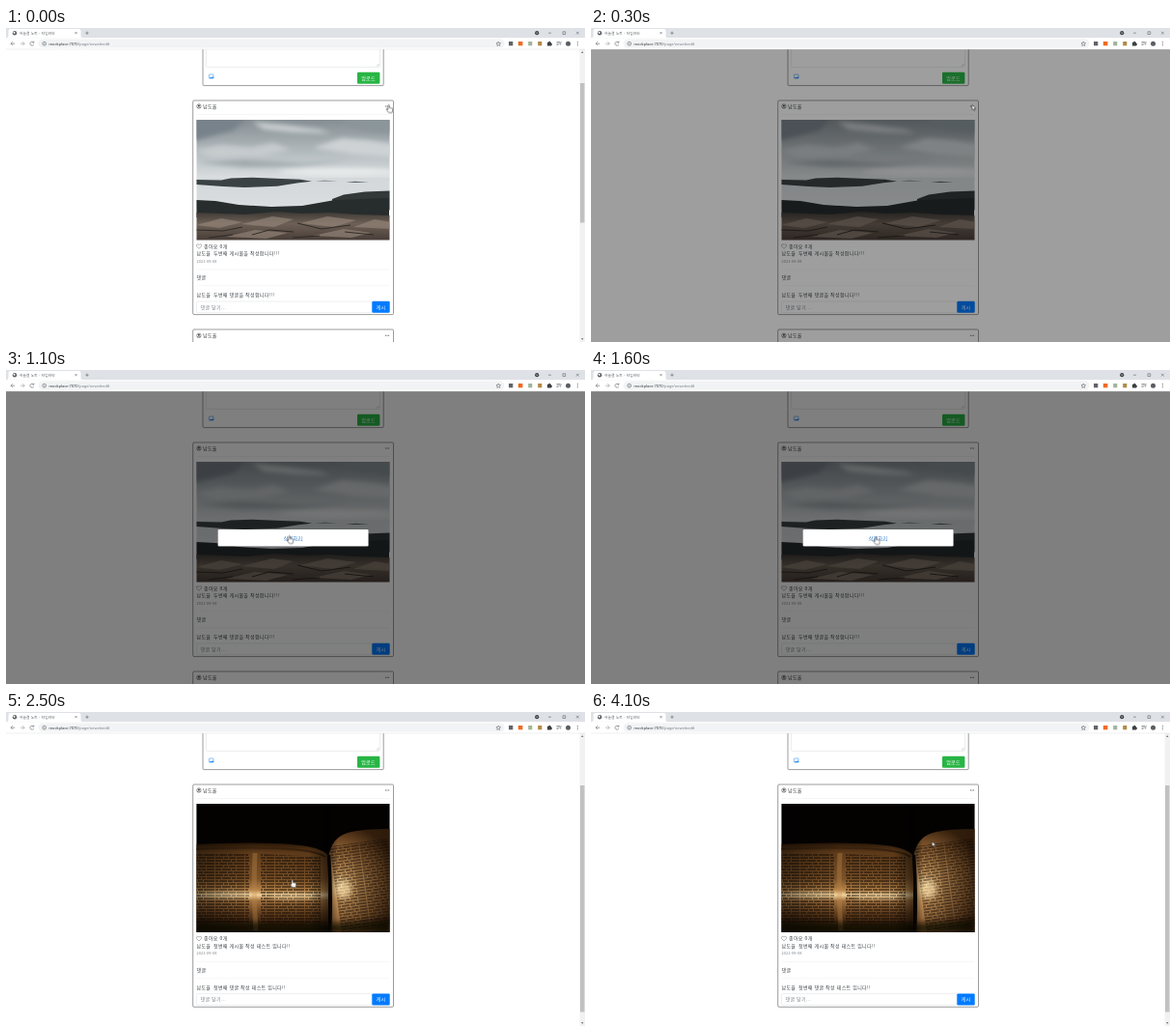
Animation of 600 by 325 pixels, one loop 4200 ms. Source, as an HTML page:

```html
<!DOCTYPE html>
<html lang="ko">
<head>
<meta charset="utf-8">
<title>Timeline</title>
<style>
html, body { margin: 0; width: 100%; height: 100%; overflow: hidden; background: #fff; }
svg { display: block; width: 600px; height: 325px; }
text { font: 5px "Noto Sans CJK KR", "Noto Sans CJK", sans-serif; letter-spacing: .33px; fill: #3d4247; }
.b { font-weight: 500; }
.date { font-size: 3.9px; letter-spacing: .1px; }
.tab { font-size: 3.7px; letter-spacing: .15px; fill: #55595e; }
.url { font: 4.1px Roboto, sans-serif; letter-spacing: 0; }
.w { fill: #fff; }
.mute { fill: #7b838a; }
.box { fill: #fff; stroke: #4a4a4a; stroke-width: .55; }
.field { fill: #fff; stroke: #ced4da; stroke-width: .4; }
.hr { stroke: #000; stroke-opacity: .1; stroke-width: .35; }
.line { fill: none; stroke: #5f6368; stroke-width: .6; }

.anim, .anim * { transform-origin: 0 0; }
.before, .after, .busy, .idle, .bar, .under, .hand, .arrow, .shade, .fade, .slide, .move {
  animation: 4200ms step-end infinite;
}
.before { animation-name: before; }
.after { animation-name: after; }
.busy { animation-name: busy; }
.idle { animation-name: idle; }
.bar { animation-name: bar; }
.under { animation-name: under; }
.hand { animation-name: hand; }
.arrow { animation-name: arrow; }
.shade { animation-name: shade; }
.fade { animation-name: fade; }
.slide { animation-name: slide; }
.move { animation-name: move; }

@keyframes before { 0% { visibility: visible } 59.52%, 100% { visibility: hidden } }
@keyframes after { 0% { visibility: hidden } 59.52%, 100% { visibility: visible } }
@keyframes busy { 0%, 59.52%, 100% { visibility: hidden } 57.14% { visibility: visible } }
@keyframes idle { 0%, 59.52%, 100% { visibility: visible } 57.14% { visibility: hidden } }
@keyframes bar { 0% { visibility: visible } 4.76%, 100% { visibility: hidden } }
@keyframes under { 0% { opacity: 0 } 26.19%, 100% { opacity: 1 } }
@keyframes hand {
  0%, 26.19%, 59.52% { visibility: visible }
  4.76%, 52.38%, 61.9%, 100% { visibility: hidden }
}
@keyframes arrow {
  0%, 26.19%, 59.52% { visibility: hidden }
  4.76%, 52.38%, 61.9%, 100% { visibility: visible }
}
@keyframes shade {
  0%, 59.52%, 100% { opacity: 0 }
  4.76% { opacity: .05 }
  7.14% { opacity: .38 }
  9.52% { opacity: .5 }
}
@keyframes fade {
  0%, 59.52%, 100% { opacity: 0 }
  9.52% { opacity: .5 }
  11.9% { opacity: 1 }
}
@keyframes slide {
  0%, 9.52% { transform: translateY(-53px) }
  11.9% { transform: translateY(-22px) }
  14.28% { transform: translateY(-3.5px) }
  16.66%, 100% { transform: none }
}
@keyframes move {
  0% { transform: translate(396px, 79.5px) }
  2.38% { transform: translate(395px, 79.5px) }
  14.28% { transform: translate(395px, 79.5px); animation-timing-function: steps(5) }
  26.19% { transform: translate(293px, 171.5px) }
  33.33% { transform: translate(293.5px, 172px) }
  38.09% { transform: translate(294.5px, 172.5px) }
  59.52% { transform: translate(296px, 173.5px) }
  69.04% { transform: translate(296px, 173.5px); animation-timing-function: steps(6) }
  83.33% { transform: translate(206px, 203px) }
  85.71% { transform: translate(190px, 209px); animation-timing-function: steps(3) }
  92.85% { transform: translate(285px, 83px); animation-timing-function: steps(2) }
  97.61%, 100% { transform: translate(353.5px, 134px) }
}
</style>
</head>
<body>
<svg class="anim" viewBox="0 0 600 325">
  <defs>
    <linearGradient id="sky" x2="0" y2="1">
      <stop offset="0" stop-color="#858e93"/>
      <stop offset=".35" stop-color="#a3abaf"/>
      <stop offset=".7" stop-color="#c3c9cc"/>
      <stop offset="1" stop-color="#dee1e2"/>
    </linearGradient>
    <linearGradient id="sea" x2="0" y2="1">
      <stop offset="0" stop-color="#d3d8da"/>
      <stop offset="1" stop-color="#d9dde0"/>
    </linearGradient>
    <linearGradient id="rock" x2="0" y2="1">
      <stop offset="0" stop-color="#3c3834"/>
      <stop offset=".4" stop-color="#6d6056"/>
      <stop offset="1" stop-color="#453b35"/>
    </linearGradient>
    <linearGradient id="page" gradientUnits="userSpaceOnUse" x1="0" y1="136" x2="0" y2="228">
      <stop offset="0" stop-color="#2b1808"/>
      <stop offset=".1" stop-color="#5e3b1a"/>
      <stop offset=".4" stop-color="#7c5228"/>
      <stop offset=".53" stop-color="#b98548"/>
      <stop offset=".58" stop-color="#efcf98"/>
      <stop offset=".64" stop-color="#a57440"/>
      <stop offset=".8" stop-color="#5c391a"/>
      <stop offset="1" stop-color="#1d0f05"/>
    </linearGradient>
    <radialGradient id="leaf" gradientUnits="userSpaceOnUse" cx="347" cy="180" r="62">
      <stop offset="0" stop-color="#f3d59e"/>
      <stop offset=".25" stop-color="#c4935a"/>
      <stop offset=".65" stop-color="#84592f"/>
      <stop offset="1" stop-color="#3c230e"/>
    </radialGradient>
    <linearGradient id="side">
      <stop offset="0" stop-opacity=".4"/>
      <stop offset=".3" stop-opacity="0"/>
      <stop offset=".58" stop-opacity=".05"/>
      <stop offset=".68" stop-opacity=".55"/>
      <stop offset=".73" stop-opacity="0"/>
      <stop offset="1" stop-opacity=".25"/>
    </linearGradient>
    <pattern id="print" width="31" height="9" patternUnits="userSpaceOnUse">
      <path d="M0 1h6m1 0h9m1 0h4m1 0h8M0 4h3m1 0h8m1 0h5m1 0h11M0 7h8m1 0h4m1 0h7m1 0h8" stroke="#150a03" stroke-width="1.5" stroke-opacity=".68"/>
    </pattern>
    <filter id="soft" x="-20%" y="-50%" width="140%" height="200%"><feGaussianBlur stdDeviation="2.5"/></filter>
    <clipPath id="clip1"><path d="M197.5 95h200v124.5h-200z"/></clipPath>
    <clipPath id="clip2"><path d="M197.5 95h200v133h-200z"/></clipPath>

    <g id="head">
      <g fill="none" stroke="#333" stroke-width=".5">
        <circle cx="199.9" cy="81" r="2.2"/>
        <path d="M198.3 82.6q1.6-1.7 3.2 0"/>
      </g>
      <circle cx="199.9" cy="80.4" r=".9" fill="#333"/>
      <text x="204" y="82.6">남도율</text>
      <path d="M393 81h.9m.7 0h.9m.7 0h.9" stroke="#333" stroke-width=".8"/>
    </g>
    <g id="foot">
      <path d="M200 228.2c-5-3.3-1.6-5.8 0-3.6c1.6-2.2 5 .3 0 3.6z" fill="none" stroke="#555" stroke-width=".45"/>
      <text class="b" x="205" y="227.9">좋아요 0개</text>
      <text x="197.5" y="235.3">남도율</text>
      <text class="date mute" x="197.5" y="242.6">2021-09-08</text>
      <path class="hr" d="M197.5 250h200M197.5 266.7h200"/>
      <text x="197.5" y="260.4">댓글</text>
      <text x="197.5" y="278.3">남도율</text>
      <rect class="field" x="197.5" y="283" width="181.5" height="11.7" rx="1"/>
      <text class="mute" x="201.5" y="290.7">댓글 달기...</text>
      <rect x="379.3" y="282.8" width="18.4" height="12" rx="1.2" fill="#007bff"/>
      <text class="w" x="383.5" y="290.7">게시</text>
    </g>
  </defs>

  <rect width="600" height="325" fill="#fff"/>

  <!-- upload form -->
  <rect class="box" x="204" y="10" width="187.2" height="49.6" rx="1.2"/>
  <rect class="field" x="207.5" y="10" width="180" height="30.5" rx="1"/>
  <path d="M384 39.5l2.5-2.5m-1 2.5l1-1" stroke="#888" stroke-width=".4"/>
  <rect x="210.4" y="48" width="4.6" height="4.2" rx=".6" fill="none" stroke="#2a8cf5" stroke-width=".55"/>
  <path d="M210.6 52l1.5-1.3 1 .6 1-1 1 .8v.9z" fill="#2a8cf5"/>
  <rect x="364" y="45.8" width="23.4" height="12" rx="1.2" fill="#28b545"/>
  <text class="w" x="368.2" y="53.7">업로드</text>

  <!-- landscape post -->
  <g class="before">
    <rect class="box" x="193.7" y="75" width="207.8" height="221.6" rx="1.2"/>
    <use href="#head"/>
    <path class="hr" d="M197.5 89.5h200"/>
    <g clip-path="url(#clip1)">
      <rect x="197" y="95" width="201" height="63" fill="url(#sky)"/>
      <g filter="url(#soft)">
        <path d="M190 90h62l-16 16-46 12z" fill="#78828a"/>
        <path d="M255 97l32 3 38 5 12 4-40-1-30-3z" fill="#c9ced0"/>
        <path d="M340 92h62v18l-34-4z" fill="#8b959a"/>
        <path d="M195 127l28-6 30 3 24-5 18 7-30 7-48 2z" fill="#c6cbce"/>
        <path d="M318 124l30-10 26 2 28 4v14l-42-3z" fill="#cdd2d4"/>
        <path d="M197 139l50-3 60 4 50-3-50 6-60 1z" fill="#9fa8ac"/>
        <ellipse cx="345" cy="149" rx="62" ry="4" fill="#e8ebeb"/>
      </g>
      <rect x="197" y="155" width="201" height="32" fill="url(#sea)"/>
      <path d="M197 157l26 .4 10-2 22-.6 30 1.200 20 .8 12 2-14 1.500-22 3.500-34 1.200-22-1-28-2z" fill="#3b4243"/>
      <path d="M320 158.500l10-.8 14 .8zM352 160l10-1.300 14 1.300z" fill="#5b6468"/>
      <path d="M338 177l12-4.500 22-3 26-1v20h-60z" fill="#333938"/>
      <path d="M197 178l20 1 24 4 34 2 32-1 34-6 56-2v20H197z" fill="#272c2c"/>
      <path d="M197 191l26 1 25 1 32-3 26 2 30-1 26 2 36 1v27H197z" fill="url(#rock)"/>
      <path d="M197 204l26-7 22 4-24 6zM244 203l32-8 22 3-20 8zM305 202l28-7 30 4-24 7zM360 206l22-8 18 3v7zM228 216l30-7 34 3-22 6zM318 215l32-7 28 4-20 5z" fill="#95867a" opacity=".65"/>
      <path d="M197 209l28 1 20-4m10 8l18-5 25 2m4-9l25 6 30-4m-60 13l28-2m26-4l30 3M210 217l25-3" fill="none" stroke="#2b2623" stroke-width=".9"/>
    </g>
    <use href="#foot"/>
    <text x="215" y="235.3">두번째 게시물을 작성합니다!!!</text>
    <text x="215" y="278.3">두번째 댓글을 작성합니다!!!</text>
    <rect class="box" x="193.7" y="312" width="207.8" height="40" rx="1.2"/>
    <use href="#head" y="237.3"/>
  </g>

  <!-- book post -->
  <g class="after">
    <rect class="box" x="193.7" y="75" width="207.8" height="230.3" rx="1.2"/>
    <use href="#head"/>
    <path class="hr" d="M197.5 89.5h200"/>
    <g clip-path="url(#clip2)">
      <rect x="197" y="95" width="201" height="134" fill="#040201"/>
      <path d="M197 137q60-3 98 0 32 2 39 12v80H197z" fill="url(#page)"/>
      <path d="M334 152c2-16 9-25 24-28q14-3 40-3v108h-62z" fill="url(#leaf)"/>
      <path d="M197 147h55v72h-55zM264 147l62 3v72h-62z" fill="url(#print)"/>
      <path transform="rotate(-8 340 180)" d="M341 139h62v90h-62z" fill="url(#print)"/>
      <path d="M197 142q60-3 98 0 28 2 36 8" fill="none" stroke="#3a220d" stroke-width="2"/>
      <path d="M258 146q-2 40 1 80" fill="none" stroke="#b5834a" stroke-width="5" opacity=".4"/>
      <path d="M334.500 148q3 40 1 80" fill="none" stroke="#0d0602" stroke-width="3.500"/>
      <g filter="url(#soft)" fill="#ffdfa6" opacity=".7">
        <ellipse cx="232" cy="189" rx="32" ry="2.500"/>
        <ellipse cx="298" cy="191" rx="26" ry="2"/>
        <ellipse cx="350" cy="184" rx="8" ry="9"/>
      </g>
      <path d="M197 216l70 2 68 1 63-5v15H197z" fill="#100702" opacity=".7" filter="url(#soft)"/>
      <rect x="197" y="95" width="201" height="134" fill="url(#side)"/>
    </g>
    <use href="#foot" y="8.6"/>
    <text x="215" y="243.9">첫번째 게시물 작성 테스트 입니다!!</text>
    <text x="215" y="286.9">첫번째 댓글 작성 테스트 입니다!!</text>
  </g>

  <!-- scrollbars -->
  <g class="bar">
    <rect x="594.5" y="22" width="5.5" height="303" fill="#f1f1f1"/>
    <rect x="595" y="57" width="4.5" height="144.5" fill="#c1c1c1"/>
    <path d="M596 25.7l1.2-1.4 1.2 1.4zM596 321.3l1.2 1.4 1.2-1.4z" fill="#555"/>
  </g>
  <g class="after">
    <rect x="594.5" y="22" width="5.5" height="303" fill="#f1f1f1"/>
    <rect x="595" y="76" width="4.5" height="234.5" fill="#c1c1c1"/>
    <path d="M596 25.7l1.2-1.4 1.2 1.4zM596 321.3l1.2 1.4 1.2-1.4z" fill="#555"/>
  </g>

  <!-- dialog -->
  <rect class="shade" y="22" width="600" height="303"/>
  <g class="fade">
    <g class="slide">
      <rect x="219.6" y="165" width="156" height="17.5" rx="1.3" fill="#fff" stroke="#000" stroke-opacity=".2" stroke-width=".4"/>
      <text x="297.6" y="175.6" text-anchor="middle" style="fill:#2a78c4">삭제하기</text>
      <path class="under" d="M287.7 176.8h19.8" stroke="#2a78c4" stroke-width=".4"/>
    </g>
  </g>

  <!-- browser frame -->
  <rect width="600" height="22" fill="#fff"/>
  <rect width="600" height="10.2" fill="#dee1e6"/>
  <path d="M0 10.3q2.5 0 2.5-2.5V3q0-2 2-2h71q2 0 2 2v4.8q0 2.5 2.5 2.5z" fill="#fff"/>
  <path d="M0 22h600" stroke="#d5d7da" stroke-width=".4"/>
  <g class="idle">
    <circle cx="9" cy="5.2" r="2.2" fill="#55585c"/>
    <path d="M7.5 4.6l1.2-.8.8 1.2-1 1zM9.5 6l1-.8" fill="#fff" stroke="#fff" stroke-width=".3"/>
  </g>
  <text class="tab" x="14" y="6.6">하늘결 노트 - 타임라인</text>
  <g class="line">
    <path d="M71.5 4.1l2.1 2.1m0-2.1l-2.1 2.1M82.4 5.2h3.2m-1.6-1.6v3.2"/>
    <path d="M562 5.2h3M577 3.8h2.700v2.700H577zM591 3.800l2.700 2.700m0-2.700l-2.700 2.700"/>
    <path d="M9.200 16.200H5m2-2l-2 2 2 2"/>
    <path d="M15 16.200h4.200m-2-2l2 2-2 2" stroke="#999"/>
    <path class="idle" d="M28.600 15a2 2 0 1 0 .2 2M28.900 13.600v1.600h-1.600"/>
    <path class="busy" d="M25.300 14.500l3.400 3.400m0-3.400l-3.400 3.400"/>
  </g>
  <circle cx="550.2" cy="5.2" r="2.1" fill="#3c4043"/>
  <path d="M549.3 4.8h1.8l-.9 1.1z" fill="#fff"/>
  <rect x="33.5" y="11.6" width="483" height="9" rx="4.5" fill="#f1f3f4"/>
  <circle class="line" cx="39.7" cy="16.2" r="1.9"/>
  <path class="line" d="M39.7 15.9v1.3m0-2.3v.4"/>
  <text class="url" x="44.5" y="17.7">mockplace:7070<tspan class="mute">/page/newsfeed#</tspan></text>
  <path class="line" d="M510.3 14l.7 1.5 1.6.2-1.2 1.100.3 1.600-1.400-.8-1.400.8.3-1.600-1.200-1.100 1.600-.2z"/>
  <rect x="521" y="14" width="4.3" height="4.3" fill="#606468"/>
  <rect x="530.8" y="14" width="4.6" height="4.3" fill="#f26a21"/>
  <rect x="541.2" y="14" width="4.1" height="4.3" fill="#9fb59a"/>
  <rect x="551.2" y="14" width="4.1" height="4.3" fill="#b08a45"/>
  <path d="M561 14.7h1.3a.9.9 0 0 1 1.8 0h1v1.3a.9.9 0 0 1 0 1.8v.7H561z" fill="#3c4043"/>
  <path class="line" d="M570.5 14.5h3.5m-3.5 1.5h3.500m-3.500 1.500h2m2.200.2v-3h1"/>
  <circle cx="582.500" cy="16.200" r="2.500" fill="#5a5e63"/>
  <path d="M592.300 13.900v.9m0 .9v.9m0 .9v.9" stroke="#555" stroke-width=".9"/>

  <!-- pointer -->
  <g class="move" fill="#fff" stroke="#111" stroke-width=".5" stroke-linejoin="round">
    <path class="arrow" d="M0 0v5.200l1.200-1.100.9 2 .9-.4-.9-1.900h1.700z"/>
    <path class="hand" d="M-.1.600q.7-1.200 1.400 0v2.500q.8-.6 1.200.2.900-.5 1.200.3.900-.3 1 .6v1.900q0 1-.7 2h-3.400l-2.200-3q-.6-1.200.4-1.100l1.100.9z"/>
  </g>
</svg>
</body>
</html>
```
